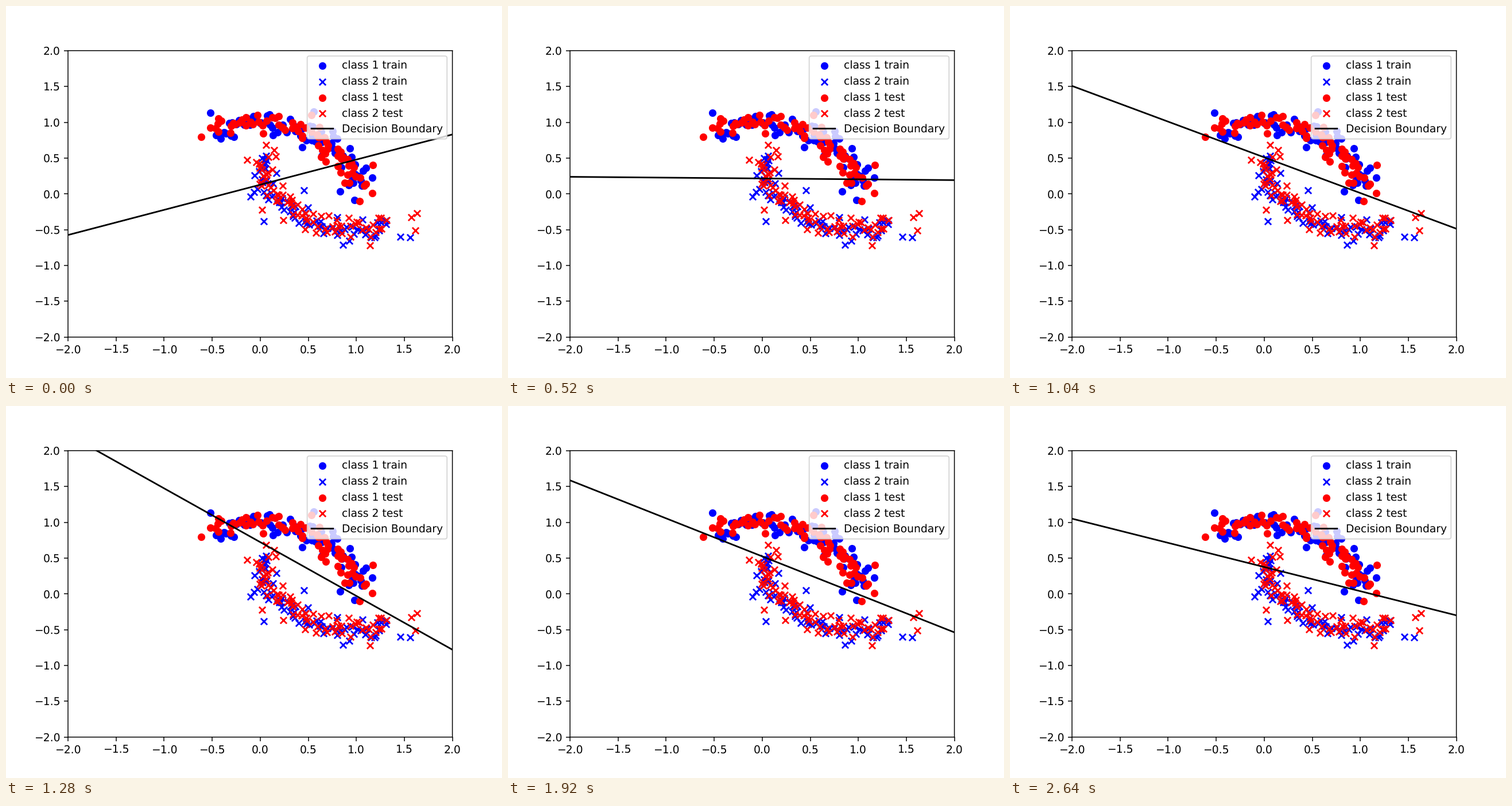
A matplotlib script that plays this animation: 864 px wide and 648 px high, repeating every 2.68 s.

```python
import numpy as np
import matplotlib.pyplot as plt
from matplotlib.animation import FuncAnimation

FRAMES = 67
INTERVAL = 40
LIMIT = 2

# Unsnapped strokes and unhinted text keep fractional pixel positions.
plt.rcParams.update({"path.snap": False, "text.hinting": "none"})

# A few stray points that shape the outline of each group
TRAIN_1 = [(-.52, 1.13), (.435, .65), (.555, 1.15), (1.165, .225),
           (.83, .03), (.98, -.085)]
TRAIN_2 = [(-.10, -.04), (.035, -.385), (.455, .05), (.86, -.71),
           (1.56, -.61), (1.46, -.60)]
TEST_1 = [(-.615, .795), (.635, .515), (.68, .45), (.53, 1.10),
          (1.175, .40), (1.165, .01), (1.035, -.10)]
TEST_2 = [(.06, .685), (.145, .61), (.02, -.22), (1.145, -.72),
          (1.63, -.27), (1.615, -.51), (1.57, -.33)]

# Boundary y = slope * x + offset at key steps: (step, slope, offset)
KEYS = [(0, .351, .1275), (7, .181, .1675), (19, -.204, .2625),
        (32, -.751, .7225), (35, -1.02, .85), (40, -.5325, .715),
        (56, -.529, .3325), (59, -.53, .37), (66, -.3375, .375)]
STEPS, SLOPES, OFFSETS = zip(*KEYS)


def upper_moon(angle, radius):
    return np.column_stack([radius * np.cos(angle), radius * np.sin(angle)])


def lower_moon(angle, radius):
    return (1, .5) - upper_moon(angle, radius)


def draw_group(moon, start, stop, count, strays, seed, color, marker, label):
    """Scatter points evenly along a moon, with random distance from its arc."""
    rng = np.random.default_rng(seed)
    angle = start + (stop - start) * (np.arange(count) + rng.random(count)) / count
    radius = rng.triangular(.82, 1, 1.18, count)
    x, y = np.vstack([moon(angle, radius), strays]).T
    ax.scatter(x, y, c=color, marker=marker, label=label)


fig, ax = plt.subplots(figsize=(6.4, 4.8), dpi=135)
for name, color, first, second in [("train", "blue", TRAIN_1, TRAIN_2),
                                   ("test", "red", TEST_1, TEST_2)]:
    seed = len(name)
    draw_group(upper_moon, .08, 2.1, 68, first, seed, color, "o",
               f"class 1 {name}")
    draw_group(lower_moon, -.05, 1.92, 72, second, seed + 10, color, "x",
               f"class 2 {name}")

ends = np.array([-LIMIT, LIMIT])
boundary, = ax.plot(ends, ends, color="black", label="Decision Boundary")
ax.set_xlim(-LIMIT, LIMIT)
ax.set_ylim(-LIMIT, LIMIT)
ax.legend(loc="upper right")


def update(step):
    slope = np.interp(step, STEPS, SLOPES)
    offset = np.interp(step, STEPS, OFFSETS)
    boundary.set_ydata(slope * ends + offset)
    return boundary,


anim = FuncAnimation(fig, update, frames=FRAMES, interval=INTERVAL,
                     repeat=True, repeat_delay=0)
plt.show()
```
